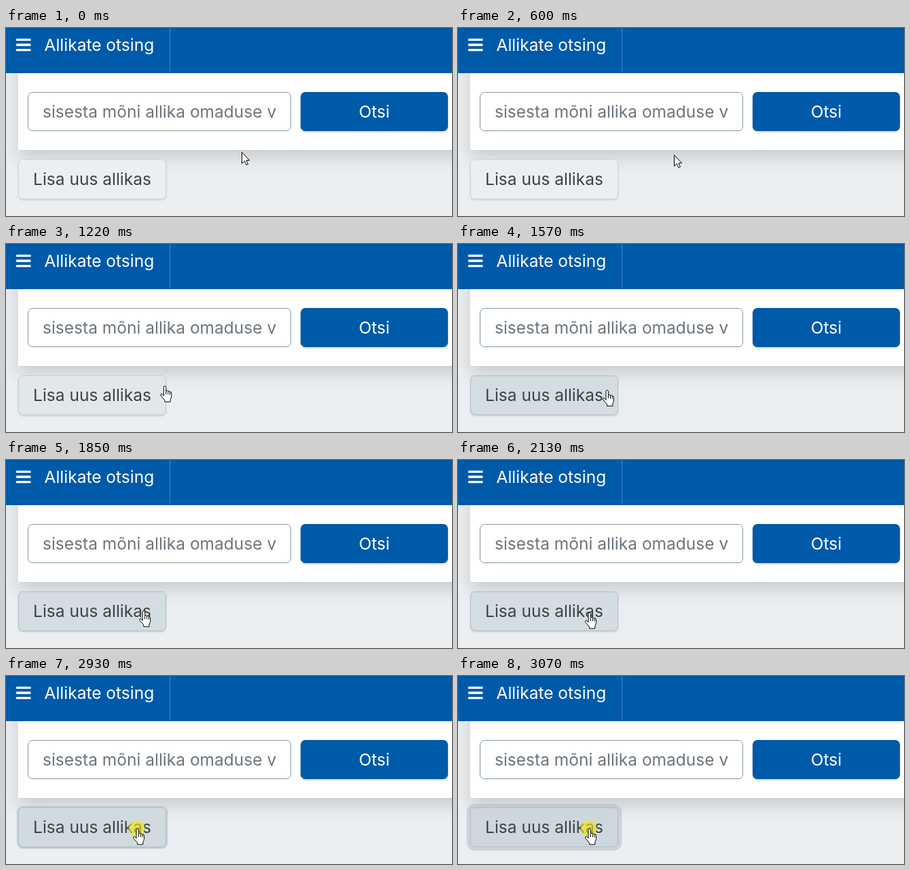
These frames come from a looping animation (657x279 px, 3.62 s). An HTML page with a canvas:

```html
<!DOCTYPE html>
<html lang="et">
<head>
<meta charset="utf-8">
<title>Allikate otsing</title>
<style>
html, body { margin: 0; width: 100%; height: 100%; overflow: hidden; background: #ebeff2; }
canvas { display: block; }
</style>
</head>
<body>
<canvas id="stage" width="657" height="279"></canvas>
<script>
const ctx = document.getElementById('stage').getContext('2d');
const LOOP = 3620, STEP = 70;
const HOVER = 1150, TIP = 2660, CLICK = 2860, FADE = 150;
const BLUE = '#005aaa', PAGE = [235, 239, 242];
const UI = '24.5px Inter, sans-serif';

// pointer hotspot: time, x, y
const path = [
  [250, 347.5, 184.5], [600, 318.5, 188.5], [800, 294.5, 195.5],
  [870, 272.5, 200], [940, 251.5, 204.5], [1010, 243.5, 207],
  [1150, 235.5, 209.5], [1360, 230.5, 212], [1570, 219.5, 216.5],
  [1920, 198.5, 225], [2130, 193.5, 226]
];

const arrow = new Path2D('M0 0V16.5L3.9 12.9L6.5 18.7L9 17.6L6.5 11.9H11.2Z');
const hand = new Path2D('M5 15V2.2Q5 .5 6.7 .5T8.4 2.2V7.5Q10 6.6 11.5 8Q13 7.4 14.2 8.9' +
  'Q16.5 8.8 16.5 11.2V15.5Q16.5 17.5 14.8 20.3V24H6.6V21.5L1.3 15.5Q-.2 13 1.2 12.2Q2.6 11.6 5 15Z');
const knuckles = new Path2D('M8.4 7.5V13M11.5 8.2V13M14.2 9V13.5');

const clamp = v => Math.max(0, Math.min(1, v));
const ease = v => v * v * (3 - 2 * v);
const mix = (a, b, p) => `rgb(${a.map((v, i) => Math.round(v + (b[i] - v) * p))})`;

// the picture only changes on a coarse clock
function snap(t) {
  const base = t < 320 ? 0 : t < 800 ? 320 : t < CLICK ? 800 : CLICK;
  return base ? base + Math.floor((t - base) / STEP) * STEP : 0;
}

function pointerAt(t) {
  if (t <= path[0][0]) return path[0].slice(1);
  const i = path.findIndex(k => k[0] >= t);
  if (i < 0) return path[path.length - 1].slice(1);
  const a = path[i - 1], b = path[i], p = (t - a[0]) / (b[0] - a[0]);
  return [a[1] + (b[1] - a[1]) * p, a[2] + (b[2] - a[2]) * p];
}

function box(x, y, w, h, r, fill, line) {
  ctx.beginPath();
  ctx.roundRect(x, y, w, h, r);
  ctx.fillStyle = fill;
  ctx.fill();
  if (!line) return;
  ctx.beginPath();
  ctx.roundRect(x + .5, y + .5, w - 1, h - 1, Math.max(0, r - .5));
  ctx.strokeStyle = line;
  ctx.lineWidth = 1;
  ctx.stroke();
}

function shadowed(color, dy, blur, draw) {
  ctx.save();
  ctx.shadowColor = color;
  ctx.shadowOffsetY = dy;
  ctx.shadowBlur = blur;
  draw();
  ctx.restore();
}

function label(str, x, y, color, align = 'left', font = UI) {
  ctx.font = font;
  ctx.textAlign = align;
  ctx.fillStyle = color;
  ctx.fillText(str, x, y);
}

function drawHeader() {
  box(0, 0, 657, 67, 0, BLUE);
  box(241, 0, 1, 67, 0, '#3b7fbd');
  for (let i = 0; i < 3; i++) box(15, 15.7 + i * 7.6, 21.5, 3.4, .9, '#fff');
  label('Allikate otsing', 56.5, 34, '#fff');
}

function drawPanel() {
  shadowed('rgba(0,0,0,.15)', 12, 24.5, () => box(18, 45, 720, 136, 0, '#fff'));
  box(32, 95, 388, 58, 7, '#fff', '#8397a5');
  ctx.save();
  ctx.beginPath();
  ctx.rect(54, 96, 344.5, 56);
  ctx.clip();
  label('sisesta mõni allika omaduse v', 54, 133, '#6c757d');
  ctx.restore();
  shadowed('rgba(0,0,0,.2)', 1.5, 3, () => box(434, 95, 217, 58, 7, BLUE));
  label('Otsi', 542.5, 133, '#fff', 'center');
}

function drawButton(hover, focus) {
  if (focus > 0) {
    const s = 5.25 * focus;
    ctx.beginPath();
    ctx.roundRect(18 - s, 195 - s, 218 + 2 * s, 59 + 2 * s, 7 + s);
    ctx.roundRect(18, 195, 218, 59, 7);
    ctx.fillStyle = 'rgba(172,186,193,.5)';
    ctx.fill('evenodd');
  }
  const rest = [212, 221, 225], pressed = [206, 215, 220];
  const fill = focus > 0 ? mix(rest, pressed, focus) : mix(PAGE, rest, hover);
  const line = mix([204, 215, 221], [173, 192, 202], hover);
  shadowed(`rgba(0,0,0,${.13 * (1 - focus)})`, 1.5, 3, () => box(18, 195, 218, 59, 7, fill));
  box(18, 195, 218, 59, 7, fill, line);
  label('Lisa uus allikas', 127, 233, '#3f4246', 'center');
}

function drawPointer(x, y, shape, dx, extra) {
  ctx.save();
  ctx.translate(x - dx, y);
  ctx.fillStyle = '#fff';
  ctx.strokeStyle = '#000';
  ctx.lineWidth = 1;
  ctx.fill(shape);
  ctx.stroke(shape);
  if (extra) ctx.stroke(extra);
  ctx.restore();
}

function render(t) {
  const q = snap(t), [x, y] = pointerAt(q);
  const hover = ease(clamp((q - HOVER) / FADE));
  const focus = ease(clamp((q - CLICK) / FADE));

  box(0, 0, 657, 279, 0, `rgb(${PAGE})`);
  drawPanel();
  drawHeader();
  drawButton(hover, focus);

  if (t >= CLICK) {
    ctx.beginPath();
    ctx.arc(x - 1, y, 12, 0, 2 * Math.PI);
    ctx.fillStyle = 'rgba(240,230,20,.62)';
    ctx.fill();
  }
  if (t >= TIP && t < CLICK) {
    box(202, 242, 93, 25, 0, '#fff', '#4d4d4d');
    label('Lisa uus allikas', 248.8, 259, '#444', 'center', '11.4px "Open Sans", sans-serif');
  }
  if (q < HOVER) drawPointer(x, y, arrow, 0);
  else drawPointer(x, y, hand, 6.5, knuckles);
}

const start = performance.now();
function tick() {
  render((performance.now() - start) % LOOP);
  requestAnimationFrame(tick);
}
tick();
</script>
</body>
</html>
```
